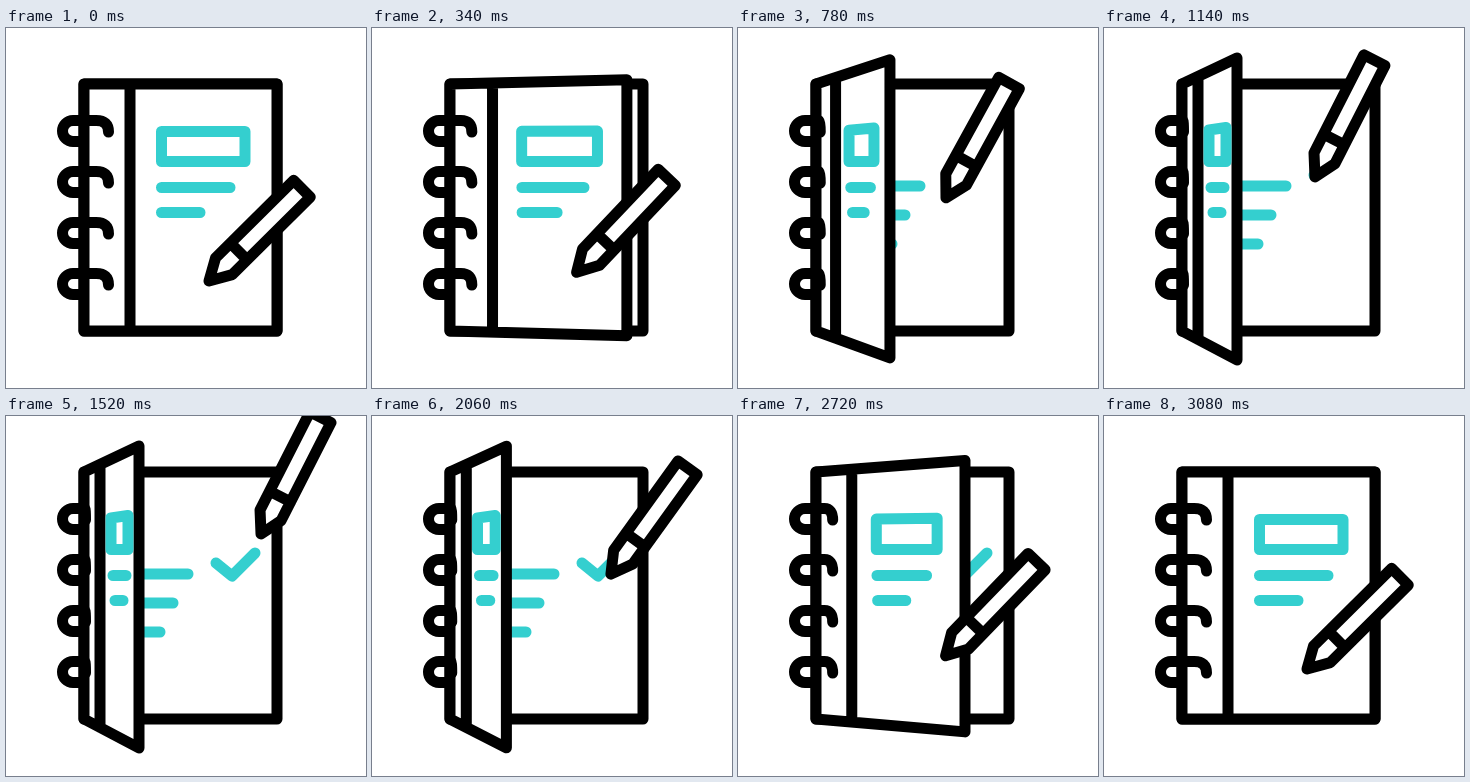
Recreate the animation shown at these times as an HTML page. Size 360 by 360 pixels, loop 3600 ms.

```html
<!DOCTYPE html>
<html lang="en">
<head>
<meta charset="utf-8">
<title>Notebook</title>
<style>
html, body { margin: 0; width: 100%; height: 100%; overflow: hidden; background: #fff; }
svg { display: block; width: 100%; height: 100%; }
.ink, .teal { fill: #fff; stroke: #000; stroke-width: 11; stroke-linecap: round; stroke-linejoin: round; }
.teal { fill: none; stroke: #34cfcf; }
#rings { fill: none; }
</style>
</head>
<body>
<svg viewBox="0 0 360 360">
  <path class="ink" d="M78 56H271V303H78Z"/>
  <path class="teal" d="M118 158H182M118 187H167M118 216H154"/>
  <path class="teal" id="check" pathLength="100" d="M210 147L226 160L249 137"/>
  <path class="ink" id="cover"/>
  <path class="teal" id="label"/>
  <path class="ink" id="rings"/>
  <path class="ink" id="pencil" d="M0 0L-11.8 -21V-131H11.8V-21ZM-11.8 -42H11.8"/>
</svg>
<script>
const LOOP = 3600;
const $ = id => document.getElementById(id);
const cover = $('cover'), label = $('label'), rings = $('rings');
const check = $('check'), pencil = $('pencil');

// Smooth track through [time, value] keys, without overshoot
function track(keys) {
  const slope = keys.slice(1).map((k, i) => (k[1] - keys[i][1]) / (k[0] - keys[i][0]));
  const tangent = keys.map((k, i) => {
    const a = slope[i - 1], b = slope[i];
    return a * b > 0 ? 2 * a * b / (a + b) : 0;
  });
  return t => {
    const last = keys.length - 1;
    if (t <= keys[0][0]) return keys[0][1];
    if (t >= keys[last][0]) return keys[last][1];
    const i = keys.findIndex(k => k[0] > t) - 1;
    const [t0, v0] = keys[i], [t1, v1] = keys[i + 1];
    const d = t1 - t0, s = (t - t0) / d, r = 1 - s;
    return v0 * (1 + 2 * s) * r * r + v1 * s * s * (3 - 2 * s)
      + d * s * r * (tangent[i] * r - tangent[i + 1] * s);
  };
}

const edge = track([[220, 0], [540, .5], [780, .862], [1080, 1], [1840, 1],
  [2060, .99], [2420, .739], [2920, .08], [3080, 0]]);
const turn = track([[220, 0], [540, .5], [780, .88], [1080, 1], [1840, 1],
  [2060, .99], [2420, .785], [2920, .08], [3080, 0]]);
const drawn = track([[1120, 0], [1270, 39], [1420, 100]]);

// time, tip x, tip y, tilt
const poses = [
  [220, 203, 253, 45.2], [540, 208, 213, 37.3], [780, 208, 170, 28.8],
  [1000, 208, 138, 27], [1120, 210, 147, 27], [1270, 226, 160, 27],
  [1420, 249, 137, 27], [1520, 255, 118, 27], [1600, 256, 117, 27.2],
  [1840, 250, 133, 31.5], [2060, 239, 158, 35.8], [2420, 219, 209, 41.3],
  [2920, 203.6, 251, 45], [3080, 203, 253, 45.2]
];
const [tipX, tipY, tilt] = [1, 2, 3].map(n => track(poses.map(p => [p[0], p[n]])));

function ring(y, end) {
  const bend = 78 + (end - 78) / 2;
  return `M${end} ${y + 1}Q${end} ${y - 10.5} ${bend} ${y - 10.5}H67` +
    `A10.5 10.5 0 0 0 67 ${y + 10.5}H76`;
}

function draw(t) {
  const v = turn(t), w = 193 - 138 * edge(t);
  const mix = (a, b) => a + (b - a) * v;

  const lift = 1.46 * v - .46 * v * v;
  const up = 26 * lift, down = 29 * lift;
  const strip = mix(46, 16), part = strip / w;
  cover.setAttribute('d', `M78 56L${78 + w} ${56 - up}V${303 + down}L78 303Z` +
    `M${78 + strip} ${56 - up * part}V${303 + down * part}`);

  const left = mix(155.5, 105), right = mix(239, 122);
  label.setAttribute('d',
    `M${left} ${mix(103.5, 102)}L${right} ${mix(103.5, 99.5)}V133.5H${left}Z` +
    `M${mix(155.5, 107)} 159.5H${mix(224, 120)}` +
    `M${mix(155.5, 109)} 184.5H${mix(194, 117)}`);

  const end = mix(102.5, 79.5);
  rings.setAttribute('d', [103, 154, 205, 256].map(y => ring(y, end)).join(''));

  const ink = drawn(t);
  check.style.display = ink > 0 ? '' : 'none';
  check.setAttribute('stroke-dasharray', ink < 100 ? `${ink} 200` : 'none');

  pencil.setAttribute('transform', `translate(${tipX(t)} ${tipY(t)}) rotate(${tilt(t)})`);
}

const start = performance.now();
function tick() {
  draw((performance.now() - start) % LOOP);
  requestAnimationFrame(tick);
}
draw(0);
requestAnimationFrame(tick);
</script>
</body>
</html>
```
